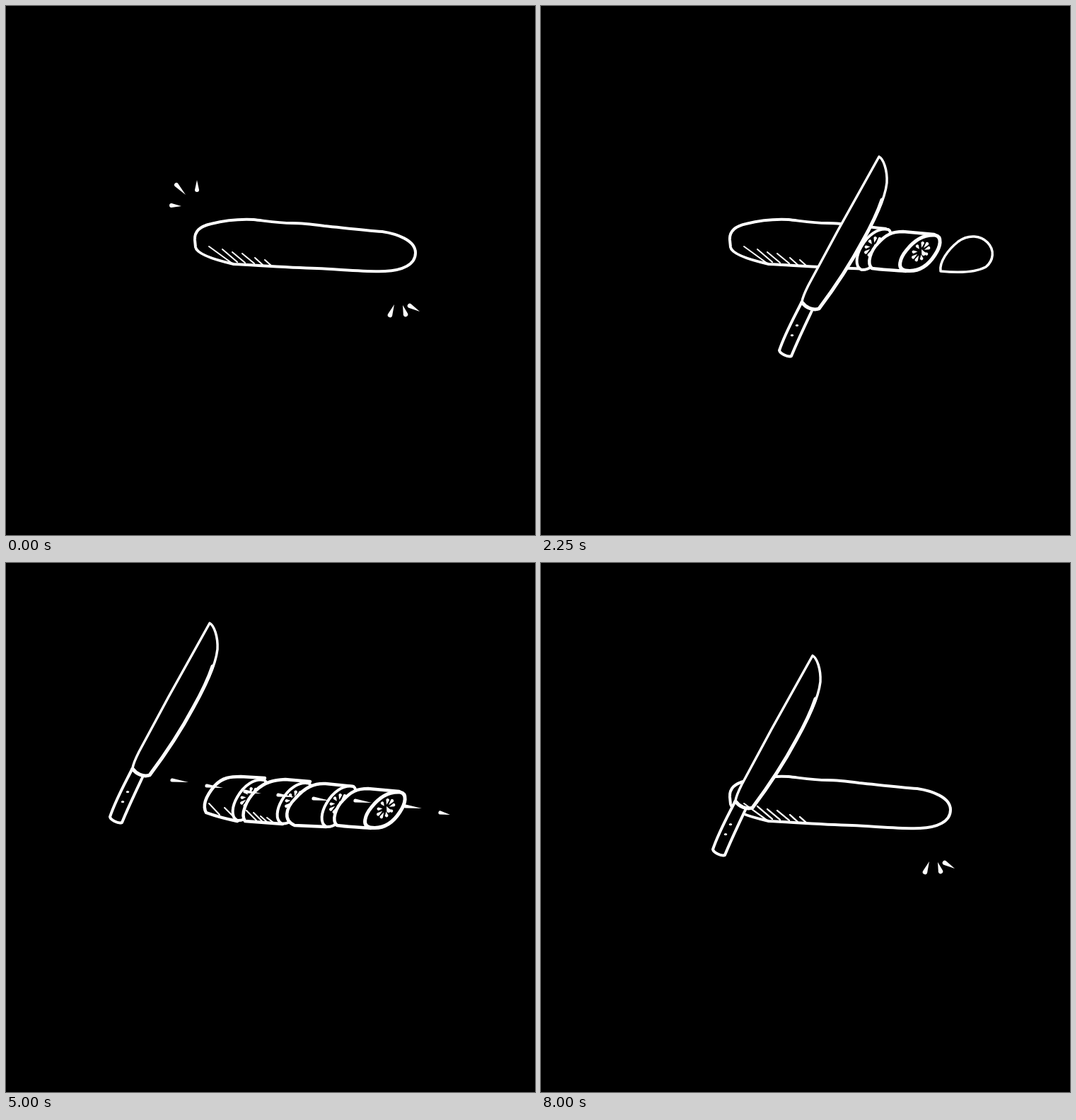
Animation, 748 px wide and 748 px high, one loop 8250 ms. Source, as an HTML page with a canvas:

```html
<!DOCTYPE html>
<html lang="en">
<head>
<meta charset="utf-8">
<title>Slicing a cucumber</title>
<style>
html, body { margin: 0; width: 100%; height: 100%; overflow: hidden; background: #000; }
canvas { display: block; width: 748px; height: 748px; }
</style>
</head>
<body>
<canvas id="stage" width="748" height="748"></canvas>
<script>
const STEP = 250, STEPS = 33;
const ctx = document.getElementById('stage').getContext('2d');
ctx.lineCap = ctx.lineJoin = 'round';

function at(x, y, draw) {
  ctx.save();
  ctx.translate(x, y);
  draw();
  ctx.restore();
}

function line(d, width = 4) {
  ctx.strokeStyle = '#fff';
  ctx.lineWidth = width;
  ctx.stroke(new Path2D(d));
}

function shape(d, width) {
  ctx.fillStyle = '#000';
  ctx.fill(new Path2D(d));
  line(d, width);
}

// A stroke that tapers from a round end of radius r to a point.
function drop(x, y, tipX, tipY, r = 3) {
  const a = Math.atan2(tipY - y, tipX - x);
  ctx.fillStyle = '#fff';
  ctx.beginPath();
  ctx.arc(x, y, r, a + Math.PI / 2, a - Math.PI / 2);
  ctx.lineTo(tipX, tipY);
  ctx.fill();
}

const CUKE = 'M267 331C266 318 276 311 290 308C310 303 330 301 350 302C368 304 385 307 405 307C420 307 435 309 450 311C480 314 505 317 532 319C552 322 579 331 579 349C579 366 560 374 536 375C510 376 480 373 440 371C400 370 360 367 322 365C300 360 270 352 268 341Z';
const HATCH = 'M287 340L320 364M306 344L327 362M320 348L338 363M334 350L351 364M352 356L363 366M366 359L375 367';
const RIGHT_END = 'M565 375C563 362 575 345 590 333C605 322 622 325 631 334C642 345 640 360 629 369C612 378 585 377 565 375Z';

// Slices are numbered from the right.
const BODIES = [
  'M516 375C495 373 482 373 468 371C460 364 466 346 477 335C488 323 497 319 512 319L556 323',
  'M453 373L408 371C392 364 395 347 409 333C423 317 436 311 452 312L491 316',
  'M391 369L338 365C331 355 340 335 353 322C366 309 380 307 395 306L430 309',
  'M327 365C312 362 297 358 283 353C277 342 284 328 295 315C306 303 318 302 332 302L366 304'
];
const HALF_BODIES = [
  'M512 374L468 371C460 362 466 346 476 337C490 331 505 333 522 334',
  'M453 373L408 371C393 364 396 345 409 329C425 322 445 323 466 325',
  'M391 369L338 365C332 355 342 335 352 323C366 311 385 310 405 312',
  'M327 365L285 354C277 342 290 325 300 312C315 304 325 306 340 306'
];
const FACE = 'M515 374C503 372 507 357 517 345C528 331 542 323 557 324C568 326 565 340 557 352C548 366 535 377 515 374Z';
const INNER_FACE = 'M453 373C443 368 446 352 453 340C462 324 477 313 491 316C499 320 490 340 483 350C476 362 466 374 453 373Z';
const HALF_FACE = 'M514 374C504 368 510 354 516 342C520 332 535 338 552 334C560 336 560 348 548 357C540 368 530 376 514 374Z';
const INNER_HALF_FACE = 'M454 373C443 366 451 346 463 326C468 318 483 319 490 324L471 349C468 362 464 372 454 373Z';
const HATCHES = { 3: 'M340 350L354 364M350 353L362 365M360 358L369 366M369 360L378 367', 4: 'M287 340L302 356M309 346L323 360' };

function seeds(x, y) {
  for (let i = 0; i < 9; i++) {
    const a = i * Math.PI * 2 / 9;
    const u = 14 * Math.cos(a), v = 8.5 * Math.sin(a);
    const dx = u * .64 + v * .77, dy = v * .64 - u * .77;
    drop(x + dx, y + dy, x + dx * .45, y + dy * .45, 2.3);
  }
  drop(x + 4, y + 3, x + 1, y - 3, 3);
}

function face(n, half) {
  const first = n === 1;
  const d = first ? (half ? HALF_FACE : FACE) : (half ? INNER_HALF_FACE : INNER_FACE);
  at(first ? 0 : -63 * (n - 2), first ? 0 : -4.5 * (n - 2), () => {
    shape(d, first ? 5 : 4);
    ctx.clip(new Path2D(d));
    seeds(first ? 537 : 470, first ? 347 : 340);
  });
}

function slices(count, half) {
  for (let n = count; n > 0; n--) {
    shape((half ? HALF_BODIES : BODIES)[n - 1], 4.5);
    if (HATCHES[n]) line(HATCHES[n], 2);
    face(n, half);
  }
}

function leftEnd(x = 0, y = 0) {
  const cut = 'M275 349C265 339 273 320 286 309C294 303 305 301 312 304L290 350Z';
  at(x, y, () => {
    shape('M275 349C258 347 252 335 254 322C258 309 275 302 303 303');
    shape(cut);
    ctx.clip(new Path2D(cut));
    seeds(288, 328);
  });
}

function cucumber(cuts) {
  if (!cuts) {
    shape(CUKE);
    line(HATCH, 2);
    return;
  }
  if (cuts === 5) {
    leftEnd();
    slices(4);
  } else {
    const x = 535 - 63 * (cuts - 1);
    ctx.save();
    ctx.clip(new Path2D(`M0 0H${x + 40}L${x + 22} 305L${x - 22} 375V748H0Z`));
    shape(CUKE);
    line(HATCH, 2);
    ctx.restore();
    face(cuts);
    slices(cuts - 1);
  }
  shape(RIGHT_END, 3.5);
}

function halves() {
  const back = [[0, 0], [54, 8], [102, 19], [156, 27]];
  for (const [x, y] of back) at(x, y, () => {
    shape('M330 300C345 286 382 286 400 299C397 306 385 302 372 302L335 308', 5);
    line('M360 307C366 301 378 298 392 302', 4);
    drop(377, 306, 382, 302, 2.5);
  });
  slices(4, true);
  line('M546 323C559 331 560 343 552 352', 7);
}

function knife([x, y]) {
  at(x, y, () => {
    shape('M418 420C408 440 395 463 387 487C388 491 398 497 404 495C412 475 424 450 433 431');
    drop(412, 451, 412, 450, 2.3);
    drop(405, 465, 405, 464, 2.3);
    shape('M528 213C534 216 540 232 539 250C536 276 520 305 505 332C490 360 470 392 443 428C434 432 424 426 419 418C420 411 424 403 428 395L470 317Z', 3.5);
    line('M532 274C524 298 514 316 505 332C490 360 470 392 443 428C434 431 424 426 419 419', 5);
  });
}

function sparksLeft(shift) {
  at(-shift, -shift, () => {
    drop(241, 253, 254, 267);
    drop(270, 260, 270, 246);
    drop(234, 282, 248, 283);
  });
}

function sparksRight(shift) {
  at(shift, shift, () => {
    drop(543, 437, 549, 422, 3.3);
    drop(565, 436, 561, 423, 3.3);
    drop(571, 424, 585, 432, 3.3);
  });
}

function crossDashes() {
  drop(554, 295, 555, 293, 2);
  drop(543, 314, 547, 306);
  drop(531, 337, 534, 330);
  drop(518, 361, 522, 353);
  drop(503, 391, 508, 380, 3.3);
}

function longDashes() {
  for (const [x, y] of [[235, 307], [284, 315], [338, 323], [385, 328], [435, 333], [494, 336], [565, 344], [614, 353]])
    drop(x, y, x + (x > 600 ? 14 : 23), y + 3, 2.6);
}

function downArrow() {
  line('M641 229L640 277M629 261L638 277L654 260', 4);
}

function sideArrows() {
  line('M188 260C178 267 167 275 161 282C167 285 173 288 178 291M178 280C200 281 221 286 239 294', 5);
  line('M221 287L239 294', 6.5);
  line('M658 337C674 330 694 332 727 335M706 319C716 322 727 326 731 333C729 341 722 347 713 350', 6);
}

const KNIFE = {
  4: [20, -18], 5: [10, -9], 6: [0, 0], 7: [5, -4], 8: [-25, -4], 9: [-50, 0], 10: [-99, -4],
  11: [-99, 0], 12: [-138.5, -36], 13: [-150, -20], 14: [-200, -30], 15: [-245, -32],
  20: [-240, -128], 21: [-205, -112], 22: [-144, -82], 23: [-44, -62], 24: [56, -42], 25: [100, -24], 26: [187, -20]
};

function knifeAt(i) {
  if (i === 32) return [-144, -82];
  if (i >= 28) {
    const k = (i - 28) / 3;
    return [-144 + 331 * k, -82 + 44 * k];
  }
  return KNIFE[i];
}

function cutsAt(i) {
  return [7, 9, 11, 13, 15].filter(start => i >= start).length;
}

function draw(i) {
  ctx.fillStyle = '#000';
  ctx.fillRect(0, 0, 748, 748);
  const blade = knifeAt(i);

  if (i < 17) {
    cucumber(cutsAt(i));
    if (i < 3) {
      const shift = i === 1 ? 14 : 0;
      sparksLeft(shift);
      sparksRight(shift);
    } else if (i < 7) crossDashes();
    if (i > 3 && i < 7) downArrow();
    if (i === 16) sideArrows();
  } else if (i < 20) {
    const k = i - 16;
    leftEnd(-80 * k, 12 * k);
    slices(4);
    at(31 * k, 6 * k, () => shape(RIGHT_END, 3.5));
  } else if (i < 27) {
    slices(4);
    longDashes();
  } else if (i < 32) {
    halves();
  } else {
    cucumber(0);
    sparksRight(0);
  }

  if (blade) knife(blade);
  if (i === 32) line(HATCH, 2);
}

let shown = -1;
function tick() {
  const i = Math.floor(performance.now() / STEP) % STEPS;
  if (i !== shown) draw(shown = i);
  requestAnimationFrame(tick);
}
tick();
</script>
</body>
</html>
```
